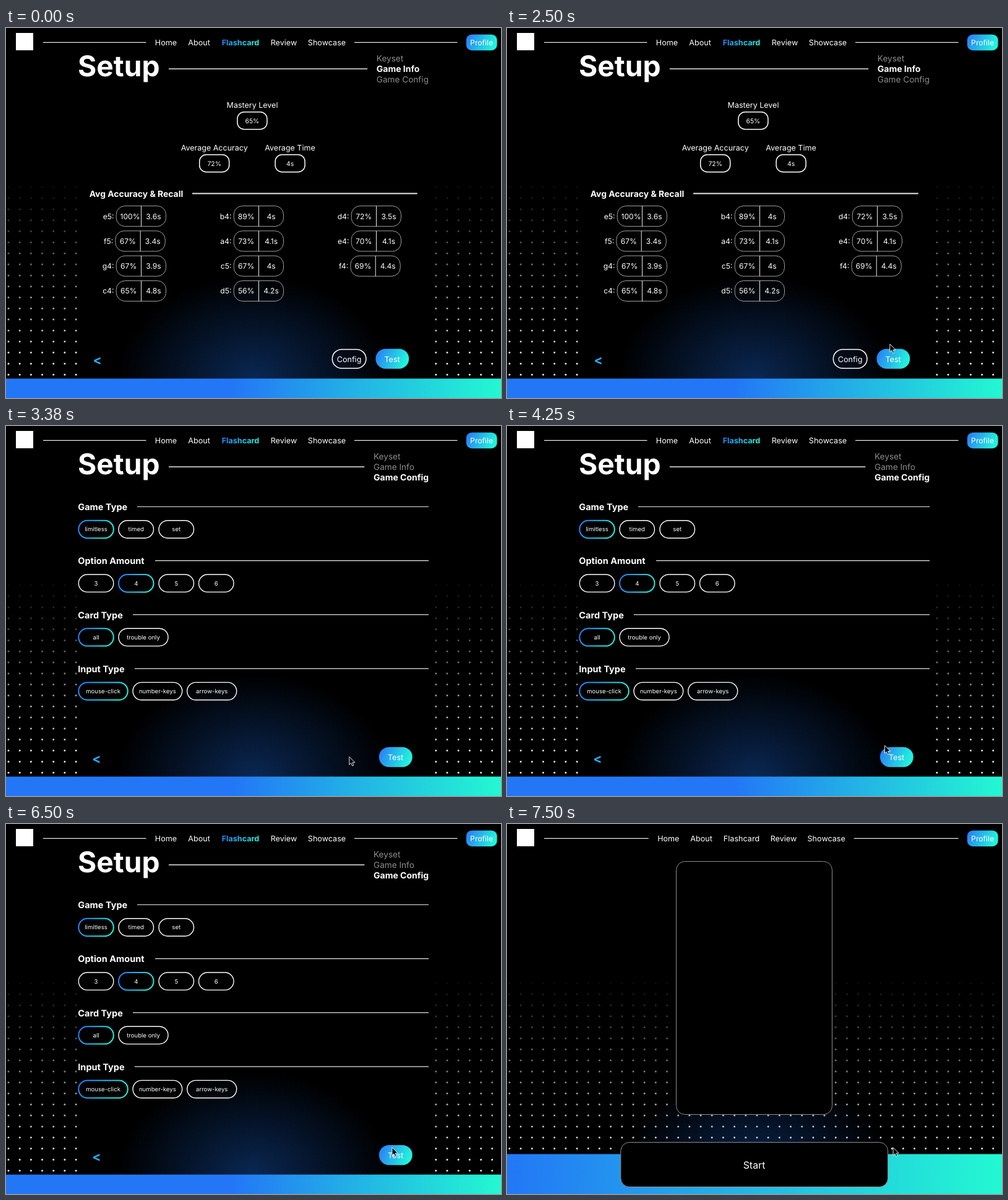
Write an HTML page that moves like this. It is 800 by 598 pixels and loops after 7870 ms.

```html
<!DOCTYPE html>
<html lang="en">
<head>
<meta charset="utf-8">
<title>Flashcard setup</title>
<style>
html, body { margin: 0; height: 100%; overflow: hidden; background: #000; }
svg { display: block; width: 100vw; height: 100vh; font-family: Inter, sans-serif; text-rendering: geometricPrecision; }
</style>
</head>
<body>
<svg id="stage" viewBox="0 0 800 598"></svg>
<script>
const LOOP = 7870, STEP = 125, CONFIG_AT = 3375, GAME_AT = 6625;

const text = (x, y, s, size, { anchor = 'middle', bold, fill = '#fff' } = {}) =>
  `<text x="${x}" y="${y}" font-size="${size}" text-anchor="${anchor}" font-weight="${bold ? 700 : 400}" fill="${fill}">${s}</text>`;
const left = (x, y, s, size, opts) => text(x, y, s, size, { anchor: 'start', ...opts });
const box = (x, y, w, h, r, { fill = 'none', stroke = 'none', width = 1.5 } = {}) =>
  `<rect x="${x}" y="${y}" width="${w}" height="${h}" rx="${r}" fill="${fill}" stroke="${stroke}" stroke-width="${width}"/>`;
const hline = (x1, x2, y, width = 1.3) =>
  `<path d="M${x1} ${y}H${x2}" stroke="#e8e8e8" stroke-width="${width}"/>`;
const group = (id, ...parts) => `<g id="${id}">${parts.join('')}</g>`;

const defs = `<defs>
  <linearGradient id="accent" x2="1" y2=".25"><stop stop-color="#2a78f8"/><stop offset="1" stop-color="#22f2dc"/></linearGradient>
  <linearGradient id="setupBar"><stop offset=".46" stop-color="#2377f6"/><stop offset="1" stop-color="#23f8d2"/></linearGradient>
  <linearGradient id="gameBar"><stop stop-color="#2377f6"/><stop offset="1" stop-color="#23f8d2"/></linearGradient>
  <radialGradient id="glow"><stop stop-color="#0a2752"/><stop offset="1" stop-color="#000"/></radialGradient>
</defs>`;

const glow = '<ellipse cx="400" cy="565" rx="220" ry="163" fill="url(#glow)"/>';

// Dot grid that brightens downwards; the middle part only shows on the game page.
function dots(middle) {
  let out = '';
  for (let row = 0; row < 18; row++)
    for (let col = 0; col < 44; col++) {
      const x = 4 + col * 18.18, y = 257.3 + row * 17.82;
      if ((x > 117 && x < 683) !== middle) continue;
      const alpha = Math.min(1, (y - 238) / 300).toFixed(2);
      out += `<circle cx="${x.toFixed(1)}" cy="${y.toFixed(1)}" r="1.5" fill="#e6e6e6" opacity="${alpha}"/>`;
    }
  return out;
}

function nav(inset, active) {
  const xs = [258.5, 312, 379, 449, 518.5], shift = [2.3, 2, 0, -2, -2.3];
  return hline(60, 226.5 + inset, 23.3) + hline(563 - inset, 729.5, 23.3) +
    ['Home', 'About', 'Flashcard', 'Review', 'Showcase'].map((s, i) =>
      text(xs[i] + (inset && shift[i]), 28.1, s, 12.6, s === active ? { bold: true, fill: 'url(#accent)' } : {})).join('');
}

function header(x, current) {
  const tabs = ['Keyset', 'Game Info', 'Game Config'].map((s, i) => {
    const bold = s === current;
    return left(x, 54.4 + i * 16.7, s, bold ? 14 : 13.6, { bold, fill: bold ? '#fff' : '#8c8c8c' });
  });
  return left(116, 78.2, 'Setup', 46.2, { bold: true }) + hline(263, x - 14.7, 66, 1.4) + tabs.join('');
}

const testButton = (x, y) => box(x, y, 53.8, 32.3, 16, { fill: 'url(#accent)' }) + text(x + 26.7, y + 21.1, 'Test', 12.6);
const back = (x, y) => text(x, y, '&lt;', 21, { bold: true, fill: '#2aaaf0' });

const stat = (cx, y, label, value, pillX) =>
  text(cx, y, label, 12.5) + box(pillX, y + 6.7, 48, 28, 11, { stroke: '#fff' }) + text(pillX + 24, y + 24.7, value, 10.4);

function noteCell(note, accuracy, time, col, row) {
  const x = 178.2 + col * 190 - (note[0] === 'f' ? 1.3 : 0), y = 287.6 + row * 40.3;
  return text(x - 3.7, y + 20.9, note + ':', 12.2, { anchor: 'end' }) +
    box(x, y, 80.3, 33, 14, { stroke: '#a0a0a0', width: 1 }) +
    `<path d="M${x + 40.3} ${y}v33" stroke="#eee" stroke-width="1"/>` +
    text(x + (accuracy.length > 3 ? 22.4 : 20), y + 20.9, accuracy, 12.1) +
    text(x + 60.3, y + 20.9, time, 12.1);
}

const notes = [
  ['e5 100% 3.6s', 'f5 67% 3.4s', 'g4 67% 3.9s', 'c4 65% 4.8s'],
  ['b4 89% 4s', 'a4 73% 4.1s', 'c5 67% 4s', 'd5 56% 4.2s'],
  ['d4 72% 3.5s', 'e4 70% 4.1s', 'f4 69% 4.4s'],
];

// Each option: label, left edge, width; an asterisk marks the chosen one.
const sections = [
  ['Game Type', 212, [['*limitless', 117.3, 56.5], ['timed', 182, 56.5], ['set', 247, 56.5]]],
  ['Option Amount', 241, [['3', 117.3, 56.5], ['*4', 182, 56.5], ['5', 247, 56.5], ['6', 311.5, 56.5]]],
  ['Card Type', 205, [['*all', 117.3, 56.5], ['trouble only', 182, 80]]],
  ['Input Type', 208, [['*mouse-click', 117.3, 79.5], ['number-keys', 205, 79.7], ['arrow-keys', 292.7, 80]]],
];

function section([title, lineX, options], i) {
  const y = 130.5 + i * 87.2;
  return left(116.3, y + 5.6, title, 14.5, { bold: true }) + hline(lineX, 683, y, 1.2) +
    options.map(([label, x, w]) => {
      const on = label[0] === '*';
      return box(x, y + 22.3, w, 28.4, 14.2, { stroke: on ? 'url(#accent)' : '#fff', width: on ? 2 : 1.4 }) +
        text(x + w / 2, y + 39.9, label.replace('*', ''), 9.6);
    }).join('');
}

const stage = document.getElementById('stage');
stage.innerHTML = defs + '<rect width="800" height="598"/>' + glow + dots(false) +
  group('setup', nav(0, 'Flashcard'), box(0, 566.6, 800, 31.4, 0, { fill: 'url(#setupBar)' })) +
  group('info',
    header(598.8, 'Game Info'),
    stat(398, 129, 'Mastery Level', '65%', 373.9),
    stat(336.7, 198, 'Average Accuracy', '72%', 312.7),
    stat(459, 198, 'Average Time', '4s', 435.1),
    left(134.7, 272.6, 'Avg Accuracy &amp; Recall', 13.9, { bold: true }), hline(301, 664.7, 267.5, 1.8),
    ...notes.flatMap((list, col) => list.map((s, row) => noteCell(...s.split(' '), col, row))),
    back(147.7, 543.8),
    box(527.3, 519.4, 54.6, 30.6, 15.3, { stroke: '#fff' }), text(554.6, 539.5, 'Config', 12.6),
    testButton(597.4, 518.4)) +
  group('config', header(594, 'Game Config'), ...sections.map(section), back(146.5, 544.6), testButton(602.9, 518.9)) +
  group('game',
    dots(true), box(0, 533.5, 800, 64.5, 0, { fill: 'url(#gameBar)' }), nav(2.2),
    box(273.5, 60.5, 252, 409, 14, { fill: '#000', stroke: '#8e8e8e', width: 1 }),
    box(183.8, 514.5, 431.8, 72, 14, { fill: '#000', stroke: '#8e8e8e', width: 1 }),
    text(399.6, 556.5, 'Start', 15.9)) +
  box(16, 8, 28, 28, 0, { fill: '#fff' }) +
  box(743.8, 10.4, 49.8, 25.8, 9, { fill: 'url(#accent)' }) + text(768.6, 28, 'Profile', 12.2) +
  '<path id="cursor" d="M0 0V12.8L2.9 10.1 4.9 14.6 7 13.7 5.1 9.3H9.2Z" stroke="#fff" stroke-width=".9"/>';

const [setup, info, config, game, cursor] =
  ['setup', 'info', 'config', 'game', 'cursor'].map(id => document.getElementById(id));

// Pointer stops: time, x, y
const path = [
  [375, 640, 600], [1250, 607.5, 527.5], [2125, 618.8, 510.8], [2625, 618.8, 510.8],
  [3125, 554.8, 534.6], [3375, 554.8, 534.6], [4125, 610.5, 516.3], [4500, 610.5, 516.3],
  [5500, 624, 522.8], [LOOP, 624, 522.8],
];

function pointer(t) {
  const i = Math.max(1, path.findIndex(p => t <= p[0]));
  const [t0, x0, y0] = path[i - 1], [t1, x1, y1] = path[i];
  const u = Math.max(0, (t - t0) / (t1 - t0)), k = u * u * (3 - 2 * u);
  return [x0 + (x1 - x0) * k, y0 + (y1 - y0) * k];
}

const show = (el, on) => el.setAttribute('display', on ? 'inline' : 'none');

function draw(now) {
  const t = Math.floor(now % LOOP / STEP) * STEP;
  show(setup, t < GAME_AT);
  show(info, t < CONFIG_AT);
  show(config, t >= CONFIG_AT && t < GAME_AT);
  show(game, t >= GAME_AT);
  cursor.setAttribute('transform', `translate(${pointer(t)})`);
}

const start = performance.now();
function tick() {
  draw(performance.now() - start);
  requestAnimationFrame(tick);
}
tick();
</script>
</body>
</html>
```
